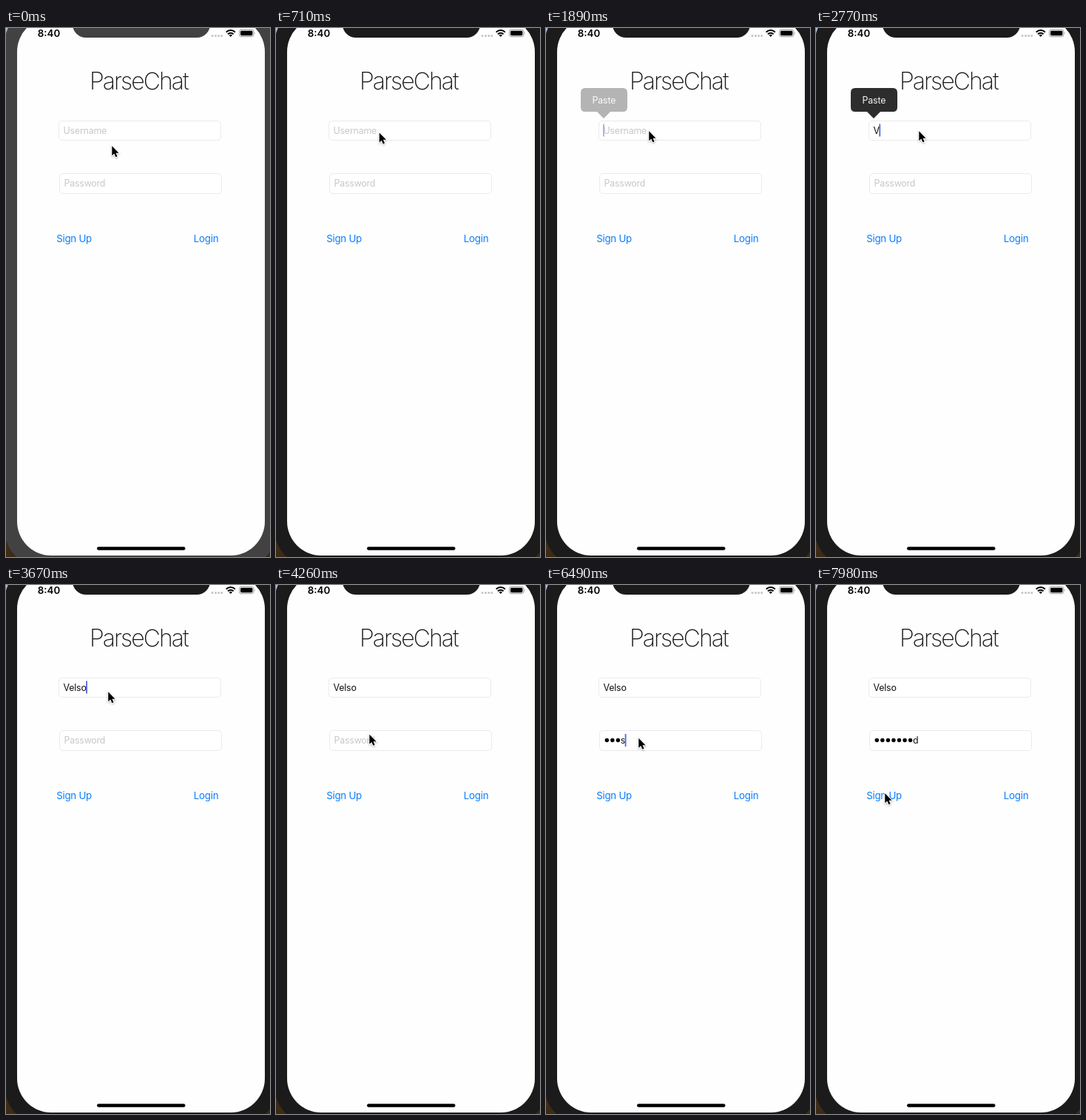
Animation of 357 by 714 pixels, one loop 8000 ms. Source, as an HTML page:

```html
<!DOCTYPE html>
<html lang="en">
<head>
<meta charset="utf-8">
<title>Sign-up form</title>
<style>
  html, body { margin: 0; width: 100%; height: 100%; overflow: hidden; }
  svg { display: block; width: 357px; height: 714px; font-family: Inter, Roboto, sans-serif; }
  text { white-space: pre; }
  .field { fill: #fff; stroke: #ebebeb; }
  .input { font-size: 12.4px; letter-spacing: -.2px; fill: #111; }
  .hint { fill: #c7c7c9; }
  .link { font-size: 13.3px; letter-spacing: -.25px; fill: #0a7cff; }
</style>
</head>
<body>
<svg viewBox="0 0 357 714">
  <defs>
    <linearGradient id="desk" x2="0" y2="1">
      <stop stop-color="#a9bfd6"/>
      <stop offset=".5" stop-color="#6c6a68"/>
      <stop offset="1" stop-color="#3d2a14"/>
    </linearGradient>
    <filter id="shade" x="-50%" y="-50%" width="200%" height="200%">
      <feDropShadow dx="0" dy="1" stdDeviation=".8" flood-opacity=".35"/>
    </filter>
  </defs>
  <rect width="357" height="714" fill="url(#desk)"/>
  <g id="body">
    <rect x="-2" y="-31" width="369" height="760" rx="53"/>
    <rect x="15" y="-14" width="335" height="726" rx="46" fill="#fefefe"/>
    <rect x="90" y="-30" width="186" height="43" rx="18"/>
  </g>

  <text x="42.8" y="11.7" font-size="13.3" font-weight="600">8:40</text>
  <g fill="#c4c4c4">
    <circle cx="279" cy="10.5" r="1.5"/><circle cx="283.5" cy="10.5" r="1.5"/>
    <circle cx="287.6" cy="10.5" r="1.5"/><circle cx="291.7" cy="10.5" r="1.5"/>
  </g>
  <g fill="none" stroke="#000" stroke-width="2">
    <path d="M297.7 5.6a8.6 8.6 0 0 1 12.2 0M300 8.2a5.4 5.4 0 0 1 7.6 0"/>
    <path d="M301.6 9.8a3.1 3.1 0 0 1 4.4 0L303.8 12z" fill="#000" stroke="none"/>
  </g>
  <rect x="315.5" y="2.3" width="19.4" height="9.4" rx="2.6" fill="none" stroke="#999"/>
  <rect x="317" y="3.8" width="16.4" height="6.4" rx="1.4"/>
  <path d="M336 5.4q1.4 1.6 0 3.2z" fill="#999"/>

  <text x="113" y="83" font-size="32" font-weight="200" letter-spacing="-1.95" fill="#1a1a1a">ParseChat</text>
  <rect class="field" x="71.5" y="125.5" width="219" height="26" rx="4.5"/>
  <rect class="field" x="72.5" y="196.5" width="219" height="27" rx="4.5"/>
  <text class="input hint" id="userHint" x="77.5" y="142.5">Username</text>
  <text class="input hint" id="passHint" x="78.5" y="213.8">Password</text>
  <text class="input" id="user" x="77.5" y="142.5"></text>
  <g id="dots"></g>
  <text class="input" id="last" y="213.8"></text>
  <rect id="caret" width="1.8" height="17" fill="#4b69dc"/>
  <text class="link" x="68.2" y="289">Sign Up</text>
  <text class="link" x="253.8" y="289">Login</text>
  <rect x="123" y="700.3" width="119.5" height="4.5" rx="2.25"/>

  <g id="paste">
    <path d="M53 81h51q6 0 6 6v20q0 6-6 6h-17l-9 9-9-9h-16q-6 0-6-6v-20q0-6 6-6z" fill="#2d2d2d"/>
    <text class="input" x="78.4" y="101.7" text-anchor="middle" style="fill:#f4f4f4">Paste</text>
  </g>
  <path id="mouse" d="M0 0V13L3 10.3 5.1 15 7.3 14 5.2 9.4H9.3Z"
        stroke="#fff" stroke-width="1.6" paint-order="stroke" filter="url(#shade)"/>
</svg>
<script>
const $ = id => document.getElementById(id);
const NAME = 'Velso', SECRET = 'password', DOT = 7.55;

// Value of the latest [time, value] key that has passed
const held = (keys, t) => keys.reduce((v, k) => t >= k[0] ? k[1] : v, 0);

const nameKeys = [2770, 2920, 3070, 3220, 3370].map((t, i) => [t, i + 1]);
const passKeys = [5150, 5300, 5600, 6490, 6790, 6940, 7080, 7230].map((t, i) => [t, i + 1]);
const caretKeys = [[1450, 1], [1890, .5], [2040, 0], [2630, 1], [3960, 0], [4410, 1],
  [5000, .5], [5150, 1], [6050, .5], [6200, 0], [6490, 1], [7530, .5], [7680, 0]];
const pasteKeys = [[1890, .35], [2040, .7], [2180, 1], [2920, .5], [3070, 0]];

// Pointer moves: start, end, steps, dx, dy
const moves = [[300, 850, 5, -4, -20], [3670, 4410, 6, -14, 67.5], [7530, 7980, 4, -32, 74.5]];

function pointer(t) {
  let x = 143.3, y = 159.3;
  for (const [from, to, n, dx, dy] of moves) {
    const step = Math.floor((t - from) / (to - from) * (n - 1) + 1.02);
    const p = Math.min(1, Math.max(0, step / n)), e = p * p * (3 - 2 * p);
    x += dx * e;
    y += dy * e;
  }
  return `translate(${x} ${y})`;
}

for (let i = 0; i < SECRET.length - 1; i++)
  $('dots').innerHTML += `<circle cx="${82.3 + DOT * i}" cy="209.5" r="2.7"/>`;

function draw(t) {
  $('body').setAttribute('fill', t < 700 ? '#424242' : '#1b1b1b');
  $('mouse').setAttribute('transform', pointer(t));

  const typed = held(nameKeys, t), count = held(passKeys, t);
  $('user').textContent = NAME.slice(0, typed);
  $('userHint').style.opacity = typed ? 0 : 1;
  $('passHint').style.opacity = count ? 0 : 1;
  [...$('dots').children].forEach((dot, i) => dot.style.opacity = i < count - 1 ? 1 : 0);
  $('last').textContent = count ? SECRET[count - 1] : '';
  const lastX = 78.2 + DOT * Math.max(0, count - 1);
  $('last').setAttribute('x', lastX);

  const inPass = t >= 4410;
  const end = inPass ? lastX + $('last').getComputedTextLength()
                     : 77.5 + $('user').getComputedTextLength();
  $('caret').setAttribute('x', end - .5);
  $('caret').setAttribute('y', inPass ? 201 : 129.5);
  $('caret').style.opacity = held(caretKeys, t);
  $('paste').style.opacity = held(pasteKeys, t);
}

const start = performance.now();
function tick() {
  draw((performance.now() - start) % 8000);
  requestAnimationFrame(tick);
}
tick();
</script>
</body>
</html>
```
